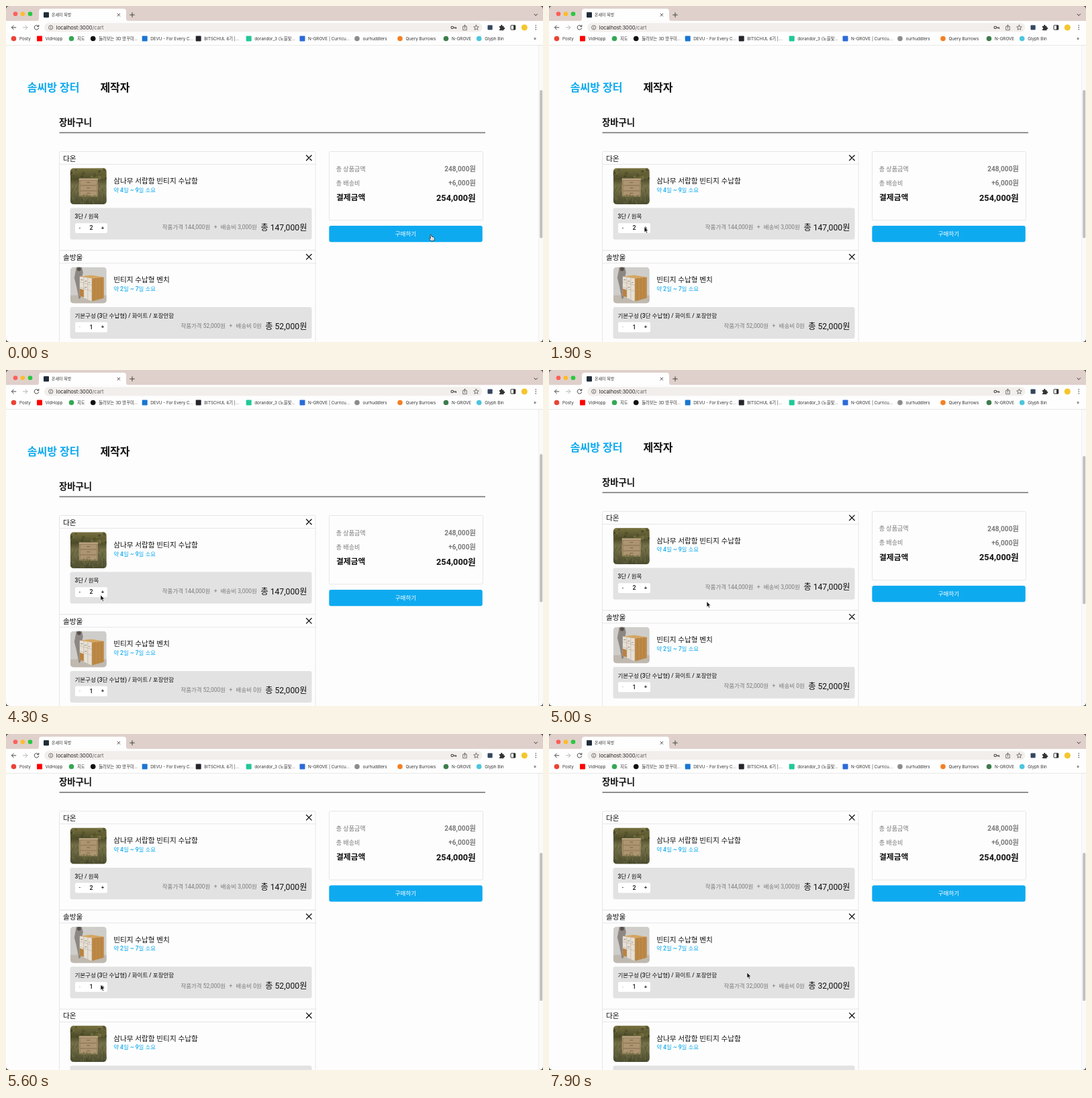
Recreate the animation shown at these times as an HTML page. Size 800 by 500 pixels, loop 8 s.

```html
<!DOCTYPE html>
<html lang="ko">
<head>
<meta charset="utf-8">
<style>
  html, body { margin: 0; width: 100%; height: 100%; overflow: hidden; background: #fdfdfd; }
  svg { display: block; width: 800px; height: 500px; }
  text { font-family: Roboto, 'Noto Sans CJK KR', 'Noto Sans KR', 'Noto Sans CJK', sans-serif; font-weight: 500; white-space: pre; }
  .ui { font-family: Inter, 'Noto Sans CJK KR', 'Noto Sans CJK', sans-serif; font-weight: 400; }
  .bold { font-weight: 700; }
  .line { fill: none; stroke-linecap: round; stroke-linejoin: round; }
</style>
</head>
<body>
<svg id="stage" viewBox="0 0 800 500" xmlns="http://www.w3.org/2000/svg"></svg>
<script>
const LOOP = 8000, STEP = 100, ROW = 147.3;
const BLUE = '#0eaaf0', GRAY = '#7b7b7b', INK = '#111', EDGE = '#e6e6e6';

const rect = (x, y, w, h, fill, r = 0, extra = '') =>
  `<rect x="${x}" y="${y}" width="${w}" height="${h}" fill="${fill}" rx="${r}" ${extra}/>`;
const circle = (x, y, r, fill) => `<circle cx="${x}" cy="${y}" r="${r}" fill="${fill}"/>`;
const line = (d, color = '#444', width = 1) =>
  `<path class="line" d="${d}" stroke="${color}" stroke-width="${width}"/>`;
const text = (x, y, size, str, fill = INK, extra = '') =>
  `<text x="${x}" y="${y}" font-size="${size}" fill="${fill}" ${extra}>${str}</text>`;
const cross = (x, y, r, width, color = INK) =>
  line(`M${x - r} ${y - r}l${2 * r} ${2 * r}m0 ${-2 * r}l${-2 * r} ${2 * r}`, color, width);
const END = 'text-anchor="end"', MID = 'text-anchor="middle"';

function seeded(seed) {
  return () => (seed = (seed * 16807) % 2147483647) / 2147483647;
}

function drawerPhoto() {
  const rnd = seeded(41);
  let out = rect(0, 0, 54, 54, 'url(#field)');
  for (let i = 0; i < 26; i++) {
    const tone = ['#4c4a26', '#8b8450', '#6c6636', '#353a20'][i % 4];
    out += `<circle cx="${rnd() * 54}" cy="${rnd() * 17}" r="${1 + rnd() * 2.2}" fill="${tone}" opacity=".55"/>`;
  }
  for (let i = 0; i < 90; i++) {
    const x = rnd() * 54, y = 27 + rnd() * 28;
    out += line(`M${x} ${y}l${rnd() * 3 - 1.5} ${-2 - rnd() * 3}`, i % 2 ? '#85804f' : '#3f4227', .5);
  }
  out += rect(13, 15.5, 28, 27, '#a78f6d') + rect(13, 15.5, 28, 2, '#bda684');
  for (const y of [18.5, 26.5, 34.5])
    out += rect(14.5, y, 25, 7, '#ad9572', 0, 'stroke="#8a7352" stroke-width=".5"') +
      rect(24.5, y + 2.5, 5, 1, '#7b6547');
  for (let i = 0; i < 24; i++) {
    const x = 10 + rnd() * 34;
    out += line(`M${x} 45l${rnd() * 2 - 1} ${-3 - rnd() * 3}`, '#66663a', .6);
  }
  return out;
}

function cabinetPhoto() {
  return rect(0, 0, 54, 54, '#cfcdc9') + rect(0, 42, 54, 12, '#bfb9b0') +
    `<path d="M9 0h8l2 8-2 9 1 25-5 6-4-20-3-12z" fill="#77716c" opacity=".75"/>` +
    circle(13, 3, 3, '#5b504a') +
    `<path d="M14 14l17-2 19 3-17 2z" fill="#d6a660"/>` +
    `<path d="M14 14l18 3v34l-18-8z" fill="#e6e0d6"/>` +
    `<path d="M32 17l18-2v31l-18 5z" fill="#bd8946"/>` +
    line('M14 22l18 5M14 30l18 6M20 15v30M26 16v32', '#b7ab99', .6) +
    line('M36 17v32M41 16.5v31M46 16v31', '#a7763a', .5) +
    `<path d="M14 32l6 2v11l-6-2z" fill="#b98241"/>` +
    line('M16 19h2M22 21h2M28 23h1M22 30h2', '#7d6c56', .8);
}

const products = {
  drawer: { seller: '다온', title: '삼나무 서랍함 빈티지 수납함', days: '약 4일 ~ 9일 소요', option: '3단 / 원목' },
  bench: { seller: '솔방울', title: '빈티지 수납형 벤치', days: '약 2일 ~ 7일 소요', option: '기본구성 (3단 수납형) / 화이트 / 포장안함' }
};

function cartItem(index, kind) {
  const p = products[kind];
  return `<g transform="translate(0 ${index * ROW})">` +
    rect(79.5, 216.5, 381.5, ROW, '#fdfdfd', index ? 0 : 2, `stroke="${EDGE}"`) +
    line('M80 235.5H461', EDGE) +
    text(85, 230.5, 10.67, p.seller) + cross(451.3, 226, 3.8, 1.3) +
    `<g transform="translate(95.8 241.2)" clip-path="url(#photoClip)"><use href="#${kind}"/></g>` +
    text(160.2, 264, 10.67, p.title) +
    text(160.2, 276.6, 8.5, p.days, BLUE) +
    rect(95.5, 300.6, 360, 47, '#e2e2e2', 3) +
    text(102.4, 316.4, 8.53, p.option) +
    rect(103, 323.3, 48, 14.8, '#fff', 2) +
    text(109.8, 333.2, 8, '-', INK, `${MID} id="minus${index}"`) +
    text(127, 333.4, 8.8, '', INK, `${MID} id="count${index}"`) +
    text(144, 333.2, 8, '+', INK, MID) +
    `<text x="448.4" y="332" font-size="8.5" fill="${GRAY}" style="font-weight:400" ${END}>` +
    `<tspan id="price${index}"></tspan><tspan dx="5.3">+</tspan>` +
    `<tspan dx="5.3">배송비 ${kind === 'drawer' ? '3,000' : '0'}원</tspan>` +
    `<tspan id="sum${index}" dx="5.5" dy="1.5" font-size="12.2" fill="${INK}"></tspan></text></g>`;
}

function summary() {
  const row = (y, label, id, value) =>
    text(491.8, y, 9.05, label, GRAY) + text(699.8, y + .4, 10.15, value, GRAY, `class="bold" ${END} id="${id}"`);
  return rect(481.5, 216.5, 229, 102.3, '#fdfdfd', 2, `stroke="${EDGE}"`) +
    row(245.6, '총 상품금액', 'goods', '') +
    row(266.5, '총 배송비', 'shipping', '+6,000원') +
    text(492, 289, 11.8, '결제금액', INK, 'class="bold"') +
    text(699.8, 289.6, 12.75, '', INK, `class="bold" ${END} id="total"`) +
    rect(481.3, 327, 228.5, 24.3, BLUE, 3) +
    text(595.4, 342.2, 8.5, '구매하기', '#fff', MID);
}

function bookmarks() {
  const list = [
    [11.5, '#ea4335', 'Posty'], [50, '#f00', 'VidHopp', 1], [97.5, '#34a853', '지도'],
    [129.7, '#111', '둘러보는 3D 방꾸미...'], [206.7, '#1976d2', 'DEVU - For Every C...', 1],
    [286.7, '#24262b', 'BITSCHUL 6기 |...', 1], [361.7, '#20c997', 'dorandor_3 (노을빛...', 1],
    [441.5, '#2b6bd8', 'N-GROVE | Curricu...', 1], [523, '#8c8c8c', 'ourhuddlers'],
    [587, '#f48024', 'Query Burrows'], [655.5, '#3d7d4c', 'N-GROVE'], [704.7, '#4cc5dd', 'Glyph Bin']
  ];
  return list.map(([x, color, label, square]) =>
    (square ? rect(x - 4, 44.5, 8, 8, color, 1) : circle(x, 48.5, 3.8, color)) +
    text(x + 8.5, 50.8, 6.3, label, '#333', 'class="ui"')).join('') +
    text(786, 50.8, 7, '»', '#333', 'class="ui"');
}

function browser() {
  return rect(0, 0, 800, 22.5, '#dfd0cb') +
    ['#fe5f57', '#febc2e', '#28c840'].map((c, i) => circle(14 + i * 11, 11.7, 3.3, c)).join('') +
    `<path d="M45 22.5q4 0 4-4V8q0-4 4-4H175q4 0 4 4v10.500q0 4 4 4z" fill="#fefefe"/>` +
    rect(0, 22.3, 800, 36, '#fefefe') +
    rect(56, 9.2, 8, 8, '#1f2d38', 1) +
    text(68, 15.4, 6, '온새미 목방', '#333', 'class="ui"') +
    cross(167.8, 13.2, 1.9, .9, '#444') +
    line('M184.7 13.200h6.600m-3.300-3.300v6.600', '#444', 1) +
    line('M787 12l2.300 2.300 2.300-2.300', '#333', 1) +
    line('M14.800 32H8.500m2.900-3l-3 3 3 3', '#444') +
    line('M25.500 32h6.300m-2.900-3l3 3-3 3', '#b5b1af') +
    line('M48.300 30.200a3.300 3.300 0 1 0 .4 2.700M48.800 28.500v2.200h-2.200', '#444') +
    rect(57, 25.2, 652.5, 13.4, '#f2eeec', 6.7) +
    `<circle cx="66.700" cy="32" r="3.100" fill="none" stroke="#555" stroke-width=".8"/>` +
    line('M66.700 31.700v1.800M66.700 30.300v.1', '#555', .8) +
    text(74.8, 34.7, 7.6, 'localhost:3000<tspan fill="#666">/cart</tspan>', '#222', 'class="ui"') +
    `<circle cx="664.800" cy="32" r="1.800" fill="none" stroke="#444" stroke-width="1.100"/>` +
    line('M666.800 32h3.800v1.500m-1.700-1.500v1.200', '#444', 1.1) +
    line('M682 30.500h-1.300v5.300h5.600v-5.300H685M683.500 33.500v-5.300m-1.500 1.500l1.500-1.500 1.500 1.500', '#555', .8) +
    line('M700.500 28.300l1.100 2.500 2.700.2-2.100 1.800.7 2.700-2.400-1.500-2.400 1.500.7-2.700-2.100-1.800 2.700-.2z', '#555', .8) +
    rect(717.5, 28.4, 7.2, 7.2, '#34465f', 1) +
    `<path d="M735 30h2v-.6a1.300 1.300 0 0 1 2.600 0v.6h2v2h.4a1.300 1.300 0 0 1 0 2.600h-.4v1.600h-6.600v-1.800a1.200 1.200 0 0 0 0-2.400z" fill="#333"/>` +
    rect(752, 28.8, 6.8, 6.4, 'none', .5, 'stroke="#333"') + rect(756, 28.8, 3, 6.4, '#333') +
    circle(772.3, 32, 4.6, '#f4c62e') +
    [29, 32, 35].map(y => circle(789.3, y, .8, '#444')).join('') +
    bookmarks() + rect(0, 58, 800, .6, '#dedbd9');
}

function corners() {
  const cut = '<path d="M0 0h5a5 5 0 0 0-5 5z" fill="#5a5552"/>';
  return ['', 'translate(800 0) scale(-1 1)', 'translate(0 500) scale(1 -1)', 'translate(800 500) scale(-1 -1)']
    .map(t => `<g transform="${t}">${cut}</g>`).join('');
}

document.getElementById('stage').innerHTML = `<defs>
  <linearGradient id="field" x2="0" y2="1">
    <stop offset="0" stop-color="#77713f"/><stop offset=".3" stop-color="#4d4c2a"/>
    <stop offset=".5" stop-color="#77724a"/><stop offset="1" stop-color="#4c4d30"/>
  </linearGradient>
  <clipPath id="photoClip"><rect width="54" height="54" rx="5"/></clipPath>
  <clipPath id="view"><rect y="58" width="800" height="442"/></clipPath>
  <g id="drawer">${drawerPhoto()}</g><g id="bench">${cabinetPhoto()}</g></defs>` +
  rect(0, 0, 800, 500, '#fdfdfd') +
  `<g clip-path="url(#view)"><g id="page">` +
  text(31.8, 127, 16, '솜씨방 장터', BLUE, 'class="bold"') +
  text(140.4, 127, 16, '제작자', INK, 'class="bold"') +
  text(79, 178, 13.33, '장바구니', INK, 'class="bold"') +
  rect(79.5, 187.7, 634.5, 1.6, '#757575') +
  cartItem(0, 'drawer') + cartItem(1, 'bench') + cartItem(2, 'drawer') + summary() +
  `</g></g>` + rect(793, 58, 7, 442, '#fafafa') + rect(793, 58, .6, 442, '#e9e9e9') +
  rect(795.2, 125, 4, 220.5, '#c0c0c0', 2, 'id="thumb"') + browser() +
  `<g id="arrow"><path d="M0 0V8.200L1.900 6.500 3.200 9.400 4.600 8.800 3.300 6H5.900Z" fill="#111" stroke="#fff" stroke-width=".6"/></g>` +
  `<g id="hand"><path d="M-1 0q1-.9 1.700.2L1.200 2.800l3.300 1q1 .4.8 1.700L4.600 9H.3L-2.300 5.800q-.4-1 .7-1l1.100.8z" fill="#fff" stroke="#222" stroke-width=".8" stroke-linejoin="round"/>` +
  line('M1.300 5.500l.2 2M2.900 5.500v2', '#222', .4) + `</g>` + corners();

const $ = id => document.getElementById(id);
const won = n => n.toLocaleString('en-US') + '원';
const smooth = u => (u = Math.min(1, Math.max(0, u)), u * u * (3 - 2 * u));

const path = [
  [0, 633, 340.5], [300, 633, 340.5], [1300, 150, 334], [1700, 142, 328.5], [2600, 142, 328.5],
  [3000, 108, 331.5], [4100, 108, 331.5], [4700, 235, 344.5], [5100, 235, 344.5],
  [5600, 141, 373], [6400, 141, 374], [6600, 130, 376.3], [6800, 109, 375.5],
  [7250, 109, 375.5], [7800, 295, 355], [LOOP, 295, 355]
];
const clicks = [
  { plus: [2100, 2400], minus: [3400, 3800], base: 2, unit: 72000 },
  { plus: [5800, 6000, 6200], minus: [6900, 7100, 7300], base: 1, unit: 32000 }
];

function cursorAt(t) {
  const i = path.findIndex(k => k[0] > t);
  const [t0, x0, y0] = path[i - 1], [t1, x1, y1] = path[i];
  const u = smooth((t - t0) / (t1 - t0));
  return [x0 + (x1 - x0) * u, y0 + (y1 - y0) * u];
}

function showItem(index, count, price, shipping) {
  $('count' + index).textContent = count;
  $('minus' + index).setAttribute('fill', count > 1 ? INK : '#b5b5b5');
  $('price' + index).textContent = '작품가격 ' + won(price);
  $('sum' + index).textContent = '총 ' + won(price + shipping);
}

function render(t) {
  const past = list => list.filter(time => t >= time).length;
  const [first, second] = clicks.map(c => c.base + past(c.plus) - past(c.minus));
  // The bench opens at a stale price until its count is first changed.
  const benchPrice = t < clicks[1].plus[0] ? 52000 : second * 32000;
  showItem(0, first, first * 72000, 3000);
  showItem(1, second, benchPrice, 0);
  showItem(2, 2, 144000, 3000);
  const goods = 248000 + (first - 2) * 72000 + (second - 1) * 32000;
  $('goods').textContent = won(goods);
  $('total').textContent = won(goods + 6000);

  const scroll = 101.7 * smooth((t - 4930) / 470);
  $('page').setAttribute('transform', `translate(0 ${-scroll})`);
  $('thumb').setAttribute('y', 125 + scroll * .51);

  const [x, y] = cursorAt(t);
  const overButton = x > 481 && x < 710 && y + scroll > 327 && y + scroll < 351;
  for (const [id, shown] of [['arrow', !overButton], ['hand', overButton]]) {
    $(id).setAttribute('transform', `translate(${x} ${y})`);
    $(id).style.display = shown ? '' : 'none';
  }
}

const start = performance.now();
function frame() {
  const t = (performance.now() - start) % LOOP;
  render(Math.floor(t / STEP) * STEP);
  requestAnimationFrame(frame);
}
frame();
</script>
</body>
</html>
```
